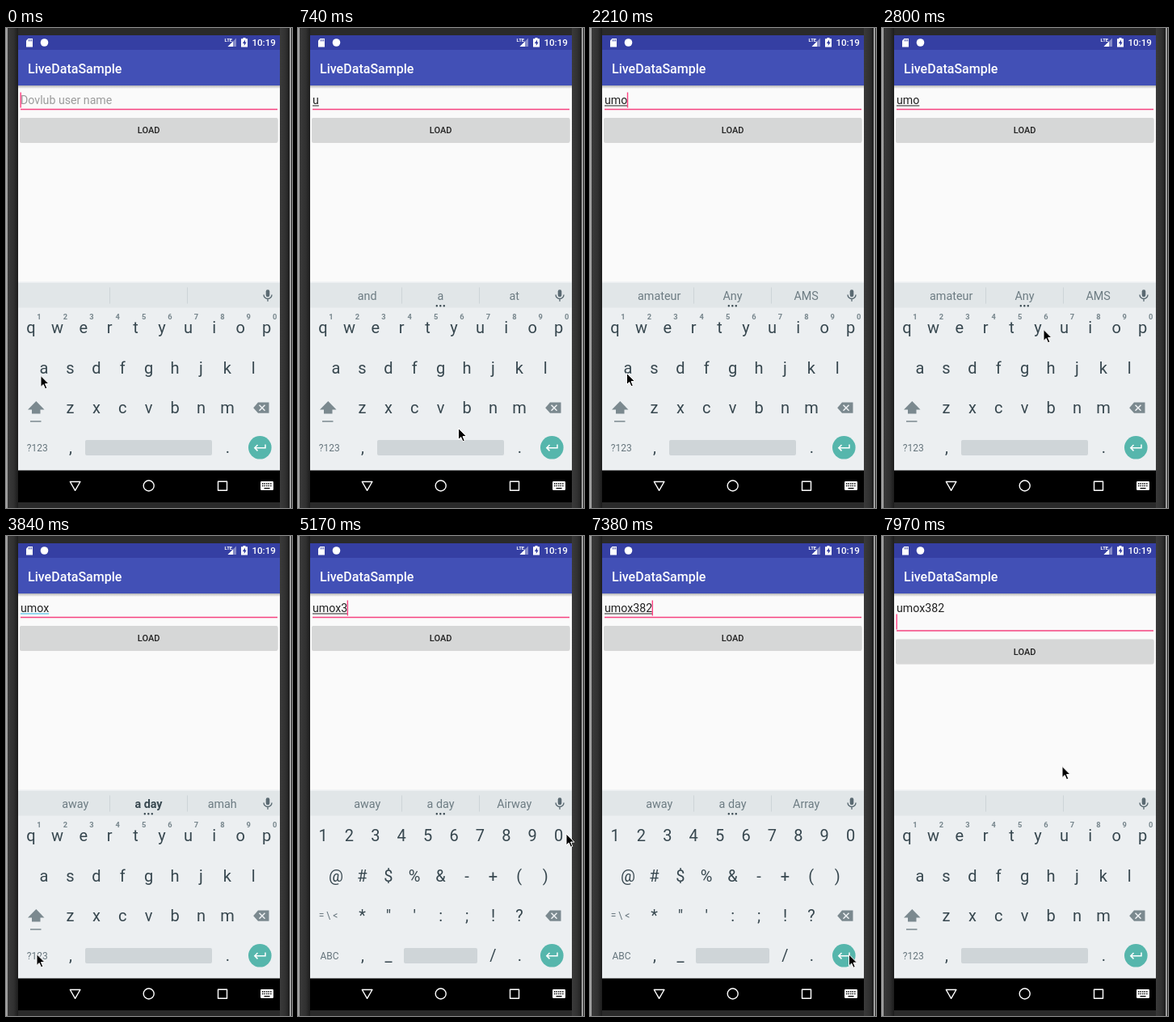
An HTML page that plays this animation: 354x593 px, repeating every 8 s.

```html
<!DOCTYPE html>
<html lang="en">
<head>
<meta charset="utf-8">
<title>Typing demo</title>
<style>
  html, body { margin: 0; width: 100%; height: 100%; overflow: hidden; background: #262626; }
  svg { display: block; width: 354px; height: 593px; font-family: Roboto, sans-serif; }
  text { white-space: pre; }
  .mid { text-anchor: middle; }
  .key { font-size: 20px; fill: #37474f; }
  .small { font-size: 12px; fill: #66757d; }
  .sup { font-size: 9.3px; font-weight: 700; fill: #76858c; }
  .sug { font-size: 14.35px; fill: #6d7c83; }
  .strong { font-weight: 700; fill: #37474f; }
  .field { font-size: 14.18px; }
</style>
</head>
<body>
<svg viewBox="0 0 354 593">
  <defs>
    <linearGradient id="bezel">
      <stop offset="0" stop-color="#3a3a3a"/>
      <stop offset=".6" stop-color="#303030"/>
      <stop offset="1" stop-color="#1c1c1c"/>
    </linearGradient>
    <linearGradient id="shade" x2="0" y2="1">
      <stop offset="0" stop-color="#000" stop-opacity=".28"/>
      <stop offset="1" stop-color="#000" stop-opacity="0"/>
    </linearGradient>
  </defs>

  <!-- device -->
  <path fill="#2a2a2a" d="M0 0h354v593H0z"/>
  <path fill="url(#bezel)" d="M2 0h13v593H2z"/>
  <path fill="url(#bezel)" d="M339 0h12v593h-12z"/>
  <path fill="#a0a0a0" d="M0 0h2v593H0zM351 0h2v593h-2z"/>
  <path fill="#fafafa" d="M15 9h324v538H15z"/>

  <!-- status bar and title -->
  <path fill="#353fa3" d="M15 9h324v18H15z"/>
  <path fill="#4250b6" d="M15 27h324v44H15z"/>
  <path fill="url(#shade)" d="M15 71h324v4H15z"/>
  <g fill="#fff">
    <path d="M27.5 13H33v10.500h-8V15.500z"/>
    <path stroke="#353fa3" stroke-width=".8" d="M28.200 14v2.500M30 14v2.500M31.700 14v2.500"/>
    <circle cx="47.500" cy="18" r="4.800"/>
    <text x="270.500" y="17" font-size="6" font-weight="700">LTE</text>
    <path opacity=".4" d="M285 12.500V23H274.500z"/>
    <path d="M281 16.500V23h-6.500z"/>
    <path d="M293.500 12h3v1.200h2.500v10.300h-8V13.200h2.500z"/>
    <path fill="#353fa3" d="M296 14.500l-3.200 4.500h1.900v3l3.100-4.500h-1.800z"/>
    <text x="304.400" y="22.300" font-size="11.600" font-weight="500">10:19</text>
    <text x="27" y="55.500" font-size="16.050" font-weight="500">LiveDataSample</text>
  </g>

  <!-- form -->
  <text class="field" id="hint" x="18" y="94" fill="#9b9b9b">Dovlub user name</text>
  <text class="field" id="typed" x="18" y="94" fill="#212121"></text>
  <rect id="under" x="18" y="95.500" height="1"/>
  <g id="form">
    <path fill="#f5427f" d="M18 99.700h318v1.500H18z"/>
    <rect x="17" y="112" width="319.500" height="30" rx="2" fill="#000" opacity=".14"/>
    <rect x="17" y="111" width="319.500" height="29.700" rx="1.800" fill="#d6d7d7"/>
    <text class="mid" x="176.700" y="130" font-size="11.030" font-weight="500" fill="#212121">LOAD</text>
  </g>
  <rect id="caret" width="1.400" height="19" fill="#ff4081"/>

  <!-- keyboard -->
  <path fill="#eceff1" d="M15 313.500h324V547H15z"/>
  <path fill="#e1e6e8" d="M15 315h324v30.500H15z"/>
  <path fill="#cdd4d8" d="M128 320.500h1v20h-1zM224 320.500h1v20h-1z"/>
  <g id="sugs"></g>
  <path id="dots" stroke="#37474f" stroke-width="2.400" stroke-linecap="round" stroke-dasharray="0 4.500" d="M171.800 343.300h10"/>
  <g fill="none" stroke="#5a6a72">
    <path stroke-width="4.600" stroke-linecap="round" d="M324 325.500v4.500"/>
    <path stroke-width="1.400" d="M319 329.500a5 5 0 0 0 10 0M324 334.500v3.300"/>
  </g>
  <g id="letters"></g>
  <g id="symbols"></g>
  <path fill="#7b898f" d="M312 462.500h13.500v13.300H312l-5.800-6.650z"/>
  <path stroke="#eceff1" stroke-width="1.600" d="M313.500 465.700l7 7M320.500 465.700l-7 7"/>
  <circle cx="314.300" cy="518.300" r="14.300" fill="#56b6ac"/>
  <path fill="none" stroke="#fff" stroke-width="1.500" d="M321 514.500v4.200h-13M311.500 515l-3.700 3.700 3.700 3.700"/>

  <!-- navigation bar -->
  <path d="M15 546.500h324V586H15z"/>
  <g fill="none" stroke="#fff" stroke-width="1.400" stroke-linejoin="round">
    <path d="M79.300 560.500h12.600l-6.300 10.800z"/>
    <circle cx="176.700" cy="565.500" r="6.500"/>
    <path d="M262.500 560.300h11v11h-11z"/>
  </g>
  <rect x="315" y="560" width="16" height="11" rx="1.300" fill="#fff"/>
  <path stroke="#000" stroke-width="1.300" stroke-dasharray="1.500 1" d="M317 563h12M317 565.700h12"/>
  <path stroke="#000" stroke-width="1.300" d="M319.500 568.700h7"/>

  <path id="mouse" stroke="#fff" stroke-width="1" stroke-linejoin="round"
    d="M.5.500v14l3.200-3 2.300 5.300 2.300-1L6 10.600h4.500z"/>
</svg>
<script>
const LOOP = 8000, TICK = 147.3, PITCH = 32.4;
const $ = id => document.getElementById(id);

function label(parent, str, x, y, cls) {
  const t = document.createElementNS('http://www.w3.org/2000/svg', 'text');
  t.setAttribute('class', 'mid ' + cls);
  t.setAttribute('x', x);
  t.setAttribute('y', y);
  t.textContent = str;
  parent.append(t);
  return t;
}

function row(parent, chars, x, y, cls = 'key') {
  [...chars].forEach((c, i) => label(parent, c, x + i * PITCH, y, cls));
}

function shape(parent, fill, d) {
  parent.insertAdjacentHTML('beforeend', `<path fill="${fill}" d="${d}"/>`);
}

const letters = $('letters'), symbols = $('symbols');
row(letters, 'qwertyuiop', 31, 377);
row(letters, '1234567890', 41, 360, 'sup');
row(letters, 'asdfghjkl', 47, 426.5);
row(letters, 'zxcvbnm', 79.5, 476);
label(letters, '?123', 38.7, 522.5, 'small');
shape(letters, '#7b898f', 'M37.3 461l10.2 10.5h-5v5H32v-5h-5zM30 485.3h13.5v1.5H30z');
shape(letters, '#cfd5d8', 'M100 509h153q2 0 2 2v15q0 2-2 2H100q-2 0-2-2v-15q0-2 2-2z');

row(symbols, '1234567890', 31, 377);
row(symbols, '@#$%&-+()', 47, 426.5);
row(symbols, '*"\':;!?', 79.5, 476);
label(symbols, '= \\ <', 37.5, 473, 'small');
label(symbols, 'ABC', 39, 522.5, 'small');
label(symbols, '_', 112, 525, 'key');
label(symbols, '/', 241.5, 525, 'key');
shape(symbols, '#cfd5d8', 'M133 509h87q2 0 2 2v15q0 2-2 2h-87q-2 0-2-2v-15q0-2 2-2z');
for (const g of [letters, symbols]) {
  label(g, ',', 80, 525, 'key');
  label(g, '.', 274.5, 525, 'key');
}

const sugs = [85.7, 176.5, 267.7].map(x => label($('sugs'), '', x, 336, 'sug'));

// each keystroke: tick, field text, suggestions
const strokes = [
  [0, '', []],
  [1, 'u', ['and', 'a', 'at']],
  [9, 'um', ['among', 'an', 'amount']],
  [14, 'umo', ['amateur', 'Any', 'AMS']],
  [21, 'umox', ['away', 'a day', 'amah']],
  [34, 'umox3', ['away', 'a day', 'Airway']],
  [42, 'umox38', ['away', 'a day', 'Array']],
  [43, 'umox382', ['away', 'a day', 'Array']],
  [51, 'umox382', []]
];
const SYMBOLS_ON = 27, ENTER = 51;

// pointer: tick, x, y
const path = [
  [0, 42.5, 429], [2, 42.5, 429], [4, 140, 500], [6, 256, 488], [8, 271, 476],
  [9, 271, 476], [10, 118.5, 431], [12, 45, 426], [15, 45, 426], [16, 50, 406],
  [17, 150, 385], [19, 199.5, 372], [22, 199.5, 372], [24, 110, 470], [26, 37.5, 516],
  [27, 37.5, 516], [28, 70, 446], [30, 344, 372], [32, 331.5, 367.5], [36, 331.5, 367.5],
  [40, 221.5, 363.5], [46, 221.5, 363.5], [49, 326, 524], [51, 314, 509], [53, 314, 509],
  [54, 222.5, 284]
];

function pointer(n) {
  const i = path.findIndex(p => p[0] >= n);
  if (i < 1) return path[i < 0 ? path.length - 1 : 0].slice(1);
  const [t0, x0, y0] = path[i - 1], [t1, x1, y1] = path[i];
  const k = (n - t0) / (t1 - t0);
  return [x0 + (x1 - x0) * k, y0 + (y1 - y0) * k];
}

const show = (el, on) => el.setAttribute('visibility', on ? 'visible' : 'hidden');

function draw(n) {
  const [since, str, words] = strokes.findLast(s => s[0] <= n);
  const entered = n >= ENTER, symbolic = n >= SYMBOLS_ON && !entered;
  const corrected = str === 'umox';

  $('typed').textContent = str;
  const width = str ? $('typed').getComputedTextLength() : 0;
  show($('hint'), !str);
  show($('under'), str && !entered);
  $('under').setAttribute('width', width);
  $('under').setAttribute('fill', corrected ? '#33b5e5' : '#212121');

  $('form').setAttribute('transform', `translate(0 ${entered ? 16.5 : 0})`);
  $('caret').setAttribute('x', entered ? 17.5 : 17.5 + width);
  $('caret').setAttribute('y', entered ? 96.5 : 79.5);
  show($('caret'), Math.floor((n - since) * TICK / 500) % 2 === 0);

  sugs.forEach((t, i) => t.textContent = words[i] || '');
  sugs[1].classList.toggle('strong', corrected);
  show($('dots'), words.length);
  show(letters, !symbolic);
  show(symbols, symbolic);

  $('mouse').setAttribute('transform', `translate(${pointer(n)})`);
}

let last = -1;
function frame() {
  const n = Math.floor(performance.now() % LOOP / TICK);
  if (n !== last) draw(last = n);
  requestAnimationFrame(frame);
}
frame();
</script>
</body>
</html>
```
